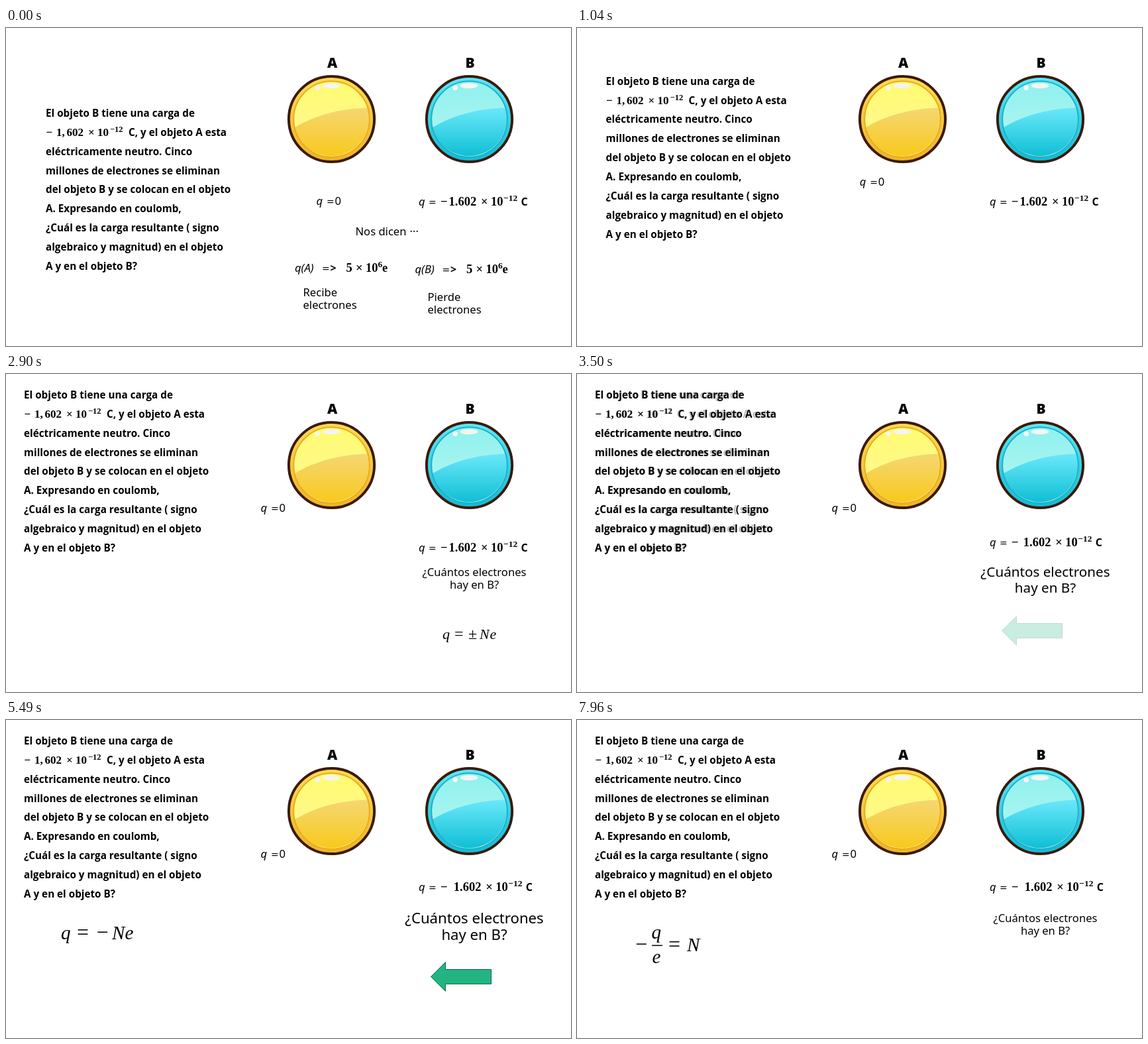
An HTML page for the animation above (8 s loop, 853 by 480 pixels).

```html
<!DOCTYPE html>
<html lang="es">
<head>
<meta charset="utf-8">
<title>Carga de dos objetos</title>
<style>
html, body { margin: 0; width: 100%; height: 100%; overflow: hidden; background: #fff; }
svg { display: block; width: 100vw; height: 100vh; }
text { fill: #000; font: 16.6px "Noto Sans", sans-serif; }
.para { font: 700 15.25px "Open Sans", sans-serif; }
.label { font: 800 21px "Open Sans", sans-serif; text-anchor: middle; }
.bold { font: 700 16px "Open Sans", sans-serif; }
.it { font-style: italic; }
.eq { font: 14px "DejaVu Sans", sans-serif; }
.num { font: 700 18.5px "Liberation Serif", serif; }
.small { font-size: 17px; }
.sup { font-size: 13.5px; }
.small.sup { font-size: 12.5px; }
.math { font: italic 22px "Liberation Serif", serif; }
.op { font: 24px "Liberation Serif", serif; }
.big.math { font-size: 29px; }
.big.op { font-size: 32px; }
.mid { text-anchor: middle; }
</style>
</head>
<body>
<svg id="stage" viewBox="0 0 853 480"></svg>
<script>
const PERIOD = 8000, STEP = 60;
const stage = document.getElementById('stage');

const txt = (x, y, s, cls = '') => `<text x="${x}" y="${y}" class="${cls}">${s}</text>`;
const group = (id, body) => `<g id="${id}">${body}</g>`;
const grad = (id, top, bottom) =>
  `<linearGradient id="${id}" x1="0" y1="0" x2="0" y2="1"><stop stop-color="${top}"/><stop offset="1" stop-color="${bottom}"/></linearGradient>`;

function ball(id, cx, c) {
  return `<defs>${grad(id + 'Rim', c.rim[0], c.rim[1])}${grad(id + 'Low', c.low[0], c.low[1])}${grad(id + 'Top', c.top[0], c.top[1])}</defs>
  <g transform="translate(${cx} 137.5)">
    <circle r="64.6" fill="url(#${id}Rim)" stroke="#3b1a0c" stroke-width="4"/>
    <circle r="57" fill="url(#${id}Top)"/>
    <path d="M-55.7 12.5C-24 -6 12 -16 54.4 -17A57 57 0 1 1 -55.7 12.5Z" fill="url(#${id}Low)"/>
    <circle r="57.3" fill="none" stroke="${c.edge}" stroke-width="2"/>
    <ellipse cx="-.5" cy="-50.3" rx="13.5" ry="4" fill="#f3f5f1"/>
    <circle cx="-21.2" cy="-47.3" r="3.8" fill="#f3f5f1"/>
  </g>`;
}

const lines = [
  'El objeto B tiene una carga de', '', 'eléctricamente neutro. Cinco',
  'millones de electrones se eliminan', 'del objeto B y se colocan en el objeto',
  'A. Expresando en coulomb,', '¿Cuál es la carga resultante ( signo',
  'algebraico y magnitud) en el objeto', 'A y en el objeto B?'
];
// Origin: left end of the first baseline
const paragraph = lines.map((s, i) => s && txt(0, (i * 28.85).toFixed(1), s, 'para')).join('') +
  txt(.5, 29, '−', 'num small') + txt(16, 29, '1,', 'num small') + txt(31.5, 29, '602', 'num small') +
  txt(64, 29, '×', 'num small') + txt(78, 29, '10', 'num small') +
  txt(97, 23, '−12', 'num small sup') + txt(125, 29, 'C, y el objeto A esta', 'para');

const gain = txt(436, 368, 'q(A)', 'it');
const loss = txt(436, 368, 'q(B)', 'it');
const amount = txt(477, 368, '=', 'eq') + txt(489.5, 368, '&gt;', 'bold') +
  txt(513.5, 368, '5', 'num') + txt(528, 368, '×', 'num') + txt(543, 368, '10', 'num') +
  txt(561.5, 361, '6', 'num sup') + txt(568, 368, 'e', 'num it');

stage.innerHTML =
  txt(492.5, 60, 'A', 'label') + txt(700.5, 60, 'B', 'label') +
  ball('gold', 491.5, { rim: ['#ffdc52', '#edb32b'], top: ['#fffb70', '#fff79a'], low: ['#f5d772', '#f8c91c'], edge: '#e9ac1f' }) +
  ball('blue', 699.5, { rim: ['#5ce9f8', '#14b9d2'], top: ['#8ff1ee', '#b8f6f1'], low: ['#6be8fa', '#10bfd5'], edge: '#1fb0ca' }) +
  group('paraA', paragraph) + group('paraB', paragraph) +
  group('chargeA', txt(0, 0, 'q', 'it') + txt(15.5, 0, '=', 'eq') + txt(28, 0, '0')) +
  group('chargeB',
    txt(623, 0, 'q', 'it') + txt(638, 0, '=', 'eq') + txt(656, 0, '−', 'num') +
    group('value', txt(668.5, 0, '1.602', 'num') + txt(717, 0, '×', 'num') + txt(732, 0, '10', 'num') +
      txt(751, -7, '−12', 'num sup') + txt(777.5, 0, 'C', 'bold'))) +
  group('given',
    txt(527.5, 313, 'Nos dicen') + txt(609.5, 313, '···') +
    gain + amount + `<g transform="translate(181.5 1.5)">${loss}${amount}</g>` +
    txt(448.5, 405, 'Recibe') + txt(448.5, 424, 'electrones') +
    txt(636.5, 412, 'Pierde') + txt(636.5, 431, 'electrones')) +
  group('question', txt(0, 0, '¿Cuántos electrones', 'mid') + txt(0, 19, 'hay en B?', 'mid')) +
  group('formula', txt(659, 400, 'q', 'math') + txt(677, 400, '=', 'op') + txt(698, 400, '±', 'op') +
    txt(715, 400, 'N', 'math') + txt(730.5, 400, 'e', 'math')) +
  group('arrow', '<path d="M641.5 387.5L663.5 365.5V376.5H732.5V398.5H663.5V409.5Z" fill="#22b581" stroke="#11694b"/>') +
  group('negative', txt(83, 331, 'q', 'big math') + txt(107, 331, '=', 'big op') + txt(136.5, 331, '−', 'big op') +
    txt(160, 331, 'N', 'big math') + txt(179.5, 331, 'e', 'big math')) +
  group('solved', txt(88, 349, '−', 'big op') + txt(112.5, 330, 'q', 'big math') +
    '<rect x="113" y="339.6" width="16" height="1.5"/>' + txt(113.5, 367, 'e', 'big math') +
    txt(138, 349, '=', 'big op') + txt(166, 349, 'N', 'big math'));

const el = {};
for (const g of stage.querySelectorAll('g[id]')) el[g.id] = g;

const clamp = v => Math.min(1, Math.max(0, v));
const mix = (a, b, k) => a + (b - a) * k;
const show = (id, k) => el[id].setAttribute('opacity', clamp(k));
const place = (id, x, y, sx = 1, sy = sx) =>
  el[id].setAttribute('transform', `translate(${x} ${y}) scale(${sx} ${sy})`);

// Cubic Bézier (.25, .1) (.25, 1)
function ease(x) {
  if (x <= 0 || x >= 1) return clamp(x);
  let lo = 0, hi = 1;
  const curve = (s, a, b) => 3 * (1 - s) * (1 - s) * s * a + 3 * (1 - s) * s * s * b + s * s * s;
  for (let i = 0; i < 24; i++) {
    const m = (lo + hi) / 2;
    if (curve(m, .25, .25) < x) lo = m; else hi = m;
  }
  return curve(lo, .1, 1);
}

const stepped = (t, start) => Math.floor((t - start) / STEP) * STEP;
const morph = (t, start, length) => ease(stepped(t, start) / length);
const fadeIn = e => clamp((e - .65) / .35);
const fadeOut = e => clamp(1 - e / .35);

function draw(t) {
  const e1 = morph(t, 500, 1850), e2 = morph(t, 2900, 1370), e3 = morph(t, 6220, 1800);

  const px = mix(60, 27, e1), py = mix(134, 37, e1), stretch = .016;
  place('paraA', px, py, 1 - stretch * e2, 1);
  place('paraB', px, py, 1 + stretch * (1 - e2), 1);
  show('paraA', 1 - e2);
  show('paraB', e2 * 1.35);

  place('chargeA', mix(468.5, 384.5, e1), mix(267, 208, e1));
  place('chargeB', 0, mix(268, 257.5, e2));
  place('value', 7.3 * e2, 0);
  show('given', fadeOut(e1));

  const size = e2 - e3;
  place('question', 707, 305 + 2 * size, 1 + .335 * size);
  show('question', fadeIn(e1));
  show('formula', fadeIn(e1) * fadeOut(e2));
  show('arrow', fadeIn(e2) * fadeOut(e3));

  const k = clamp((stepped(t, 4890) + STEP) / 660);
  place('negative', 85 * (1 - k) * (1 - k), 0);
  show('negative', k * fadeOut(e3));
  show('solved', fadeIn(e3));
}

function tick() {
  draw(performance.now() % PERIOD);
  requestAnimationFrame(tick);
}
tick();
</script>
</body>
</html>
```
